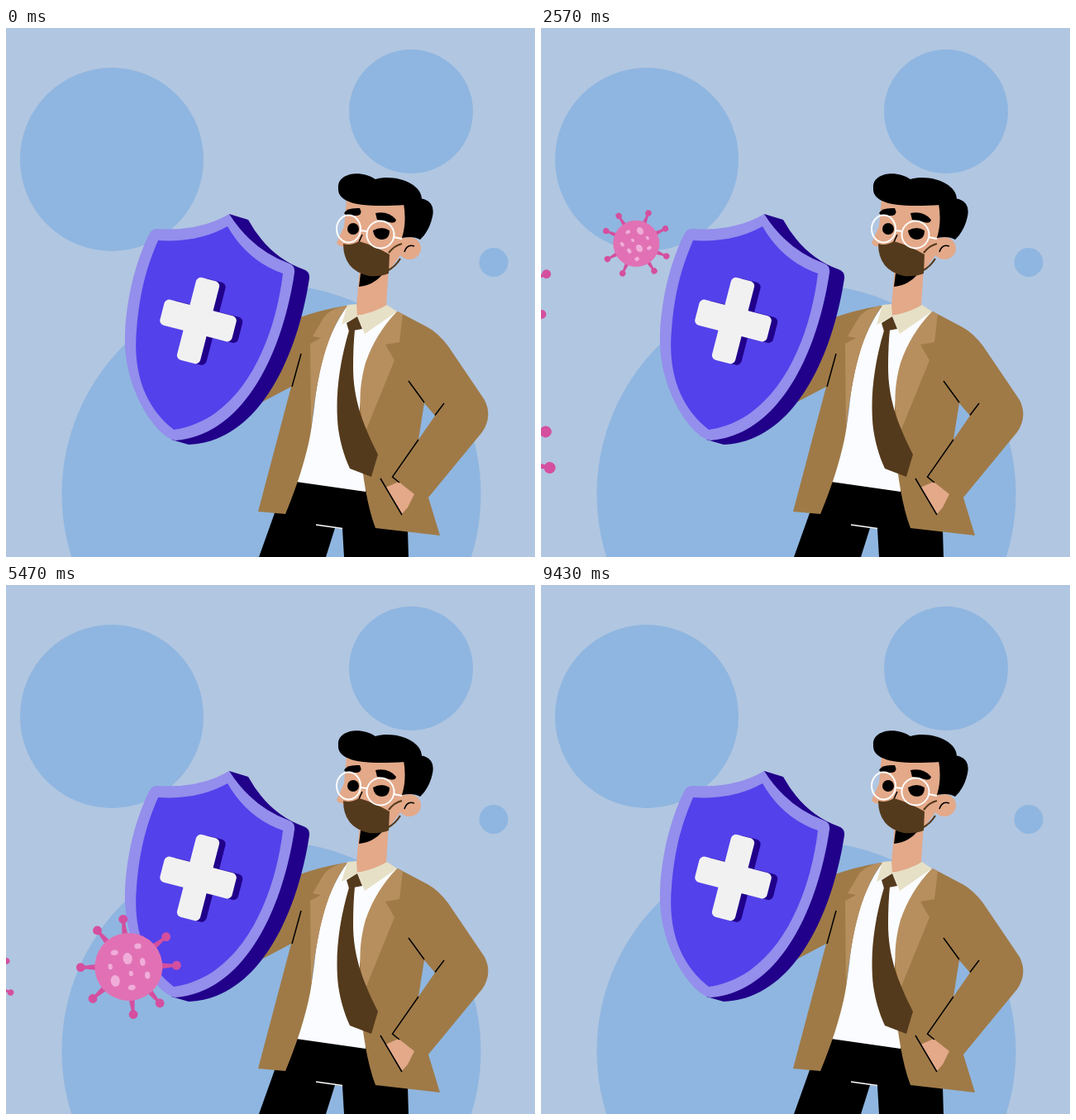
An HTML page that plays this animation: 640 by 640 pixels, repeating every 9610 ms.

```html
<!DOCTYPE html>
<html lang="en">
<head>
<meta charset="utf-8">
<title>Shield against viruses</title>
<style>
  html, body { margin: 0; width: 100%; height: 100%; overflow: hidden; background: #b1c6e1; }
  svg { display: block; width: 100%; height: 100%; }
  .line { fill: none; stroke: #000; stroke-width: 1.5; }
  .jacket { fill: #9f7a47; }
  .lapel { fill: #b78f5f; }
  .skin { fill: #e3a989; }
  .dark { fill: #543a1c; }
  .collar { fill: #e6e0c6; }
  .glasses { fill: none; stroke: #fff; stroke-width: 2; }
</style>
</head>
<body>
<svg viewBox="0 0 640 640" id="stage">
  <defs>
    <g id="cross">
      <rect x="-14.5" y="-51.5" width="29" height="103" rx="6"/>
      <rect x="-45" y="-16" width="90" height="32" rx="6"/>
    </g>
    <g id="virus"></g>
  </defs>

  <rect width="640" height="640" fill="#b1c6e1"/>
  <g fill="#8fb6e0">
    <circle cx="128" cy="159" r="111"/>
    <circle cx="490" cy="101" r="75"/>
    <circle cx="590" cy="283.5" r="17.5"/>
    <circle cx="321" cy="564" r="253.5"/>
  </g>

  <g id="man">
    <path d="M351 546L436 558L448 603L486 607L487 640H409L407 606L398 605L387 640H306L326 584L338 587Z"/>
    <path d="M375 601L407 605.5" stroke="#fff" stroke-width="1.3"/>
    <path fill="#fafcff" d="M413 336C386 375 378 410 373 460C368 500 358 530 351 549L435 561L442 450L474 344Z"/>
    <path class="jacket" d="M411 336Q380 341 350 352L290 463L345 434L305 585L338 588C352 555 366 512 370 480C375 435 383 375 413 336Z"/>
    <path class="lapel" d="M411 336Q391 340 384 351L371 373L381 375L368 382L369 484C375 435 384 372 413 336Z"/>
    <path class="jacket" fill-rule="evenodd" d="M474 343L510 362Q523 369 535 385L579 450Q589 470 576 489L511 568L525 614L447 605C432 565 426 500 428 460C431 425 447 375 474 343ZM506 454L519 469L499 498Z"/>
    <path class="lapel" d="M473 343L480 346L476 380L459 383L470 402L435 488C425 460 428 430 435 405Q447 370 473 343Z"/>
    <path class="skin" d="M459 556L475 549L494 564L486 580L479 588Z"/>
    <path class="line" d="M357 394L346 434M487 427L506 453M530 454L519 468.5M499 498L467.500 543L476 550M453 545L479 589"/>

    <path class="skin" d="M428 290L423 348Q446 346 460 336L463 288Z"/>
    <path class="collar" d="M413 335L406 359L425 349L424 334Z"/>
    <path class="collar" d="M425 348L434 370L473 343L461 335Q446 344 425 348Z"/>
    <path class="dark" d="M425 349L412 357L415 367L431 364Z"/>
    <path class="dark" d="M415 366C402 410 398 450 402 485C405 505 410 520 416 533L442 543L450 516C432 480 420 450 420 410Q420 385 422 365Z"/>
    <path d="M429 297L427 313Q446 311 457 296Z"/>

    <path class="skin" d="M412 208L409 240L400 260Q401 264 410 265L440 296L462 295L481 270L484 208Z"/>
    <ellipse class="skin" cx="488" cy="266.500" rx="14" ry="13.500"/>
    <path d="M481 212L500 206Q520 208 516 228Q512 246 501 256Q493 251 479 254Q485 235 481 212Z"/>
    <path d="M402 193C401 175 430 171 447 183C470 176 504 188 503 208L483 214C450 216 425 215 415 210Q401 205 402 193Z"/>
    <path d="M409 224Q412 217 428 218Q432 226 425 227L412 227Z"/>
    <path d="M447 224Q463 221 472 232Q471 237 464 235L449 232Z"/>
    <circle cx="420" cy="243" r="7"/>
    <path d="M444 245Q455 239 464 245Q464 256 454 256Q445 255 444 245Z"/>
    <path class="line" d="M431 250L426 261M482 271Q485 261 494 264"/>
    <path class="dark" d="M408 261Q417 264 427 258Q445 263 464 274L463 297Q452 301 439 300Q408 293 408 261Z"/>
    <path d="M463 272Q470 263 479 261M461 294Q471 289 477 279" fill="none" stroke="#543a1c" stroke-width="2.200"/>
    <g class="glasses">
      <ellipse cx="414.500" cy="243" rx="14.500" ry="16.500"/>
      <circle cx="453" cy="250" r="16.500"/>
      <path d="M429 245L437 246M469 253L479 255"/>
    </g>
  </g>

  <g id="shield">
    <path fill="#21008a" d="M270 225L293 232Q318 277 360 292Q368 295 367 303C352 400 305 501 221 504L200 498Z"/>
    <path fill="#948eec" d="M270 225Q298 269 343 285Q350 288 349 296C335 390 290 492 205 499C185 497 141 440 144 370C146 320 160 275 174 248Q177 243 183 243Q235 246 270 225Z"/>
    <path fill="#5341eb" d="M268 240Q292 282 335 297C325 380 285 474 203 486C170 460 153 420 158 365C162 315 172 285 184 257Q232 260 268 240Z"/>
    <use href="#cross" fill="#21008a" transform="translate(240 355.500) rotate(14.500)"/>
    <use href="#cross" fill="#f1f1f2" transform="translate(232.500 354) rotate(14.500)"/>
  </g>
  <g id="viruses"></g>
</svg>
<script>
const LOOP = 9610;
const SPIN = -0.066;      // degrees per ms
const SQUASH_MS = 80;

const spikeAngles = [0, 58, 95, 146, 181, 235, 276, 326];
// x, y, rx, ry
const spots = [
  [23.5, 14, 3.4, 4.2], [19, -15, 3.2, 4.4], [10, 0, 7, 5.6],
  [4, 17.5, 4.8, 3.3], [2.7, -22, 3.5, 2.6], [-8.3, 2, 3.3, 2.6],
  [-12.7, 21.5, 4.4, 3.2], [-15, -18, 7, 5.5], [-25.3, 1, 3.2, 4.4]
];

document.getElementById('virus').innerHTML =
  spikeAngles.map(a => `<g transform="rotate(${a})" fill="#d44f9f">
    <path d="M38 -3.600L57 -1.500V1.500L38 3.600Z"/><circle cx="58" r="5.400"/></g>`).join('') +
  '<circle r="41" fill="#e171b4"/>' +
  spots.map(([x, y, rx, ry]) =>
    `<ellipse cx="${x}" cy="${y}" rx="${rx}" ry="${ry}" fill="#f0add9"/>`).join('');

// Each trip: enter time, enter y, hit time, hit x, hit y, leave time, leave y, angle at hit
const viruses = [
  { scale: 1.293, edge: -82, trips: [
    [90, 300, 1340, 204, 334, 2658, 531, 92],
    [3010, 557, 4450, 206, 305, 5420, 195, -89],
    [5540, 212, 7000, 206, 436, 7960, 776, -19]
  ] },
  { scale: 1, edge: -61, trips: [
    [905, 560, 1900, 223, 400, 2602, 312, 110],
    [2960, 560, 3900, 239, 400, 4646, 308, 81],
    [4760, 404, 5840, 257, 492, 6600, 260, -121],
    [6772, 239, 7860, 258, 340, 8640, 266, -197]
  ] },
  { scale: 0.683, edge: -43, trips: [
    [20, 165, 970, 164, 333, 1560, 258, -75],
    [1830, 256, 2900, 185.5, 263, 3500, 222, 35],
    [3770, 480, 4830, 206, 406, 5503, 482, 6],
    [5850, 290, 6820, 207, 203, 7500, 179, -144],
    [7700, 465, 8740, 207, 358, 9430, 454, 0]
  ] }
];

const layer = document.getElementById('viruses');
for (const virus of viruses) {
  virus.node = document.createElementNS('http://www.w3.org/2000/svg', 'use');
  virus.node.setAttribute('href', '#virus');
  layer.append(virus.node);
}

const mix = (a, b, p) => a + (b - a) * p;

function place({ node, scale, edge, trips }, t) {
  const trip = trips.find(([enter, , , , , leave]) => t >= enter && t < leave);
  node.setAttribute('visibility', trip ? 'visible' : 'hidden');
  if (!trip) return;
  const [enter, enterY, hit, hitX, hitY, leave, leaveY, angle] = trip;
  const away = t < hit ? (hit - t) / (hit - enter) : (t - hit) / (leave - hit);
  const x = mix(hitX, edge, away);
  const y = mix(hitY, t < hit ? enterY : leaveY, away);
  const squash = 1 - 0.2 * Math.max(0, 1 - Math.abs(t - hit) / SQUASH_MS);
  node.setAttribute('transform',
    `translate(${x} ${y}) scale(${scale * squash} ${scale}) rotate(${angle + SPIN * (t - hit)})`);
}

const start = performance.now();
function frame() {
  const t = (performance.now() - start) % LOOP;
  viruses.forEach(virus => place(virus, t));
  requestAnimationFrame(frame);
}
frame();
</script>
</body>
</html>
```
